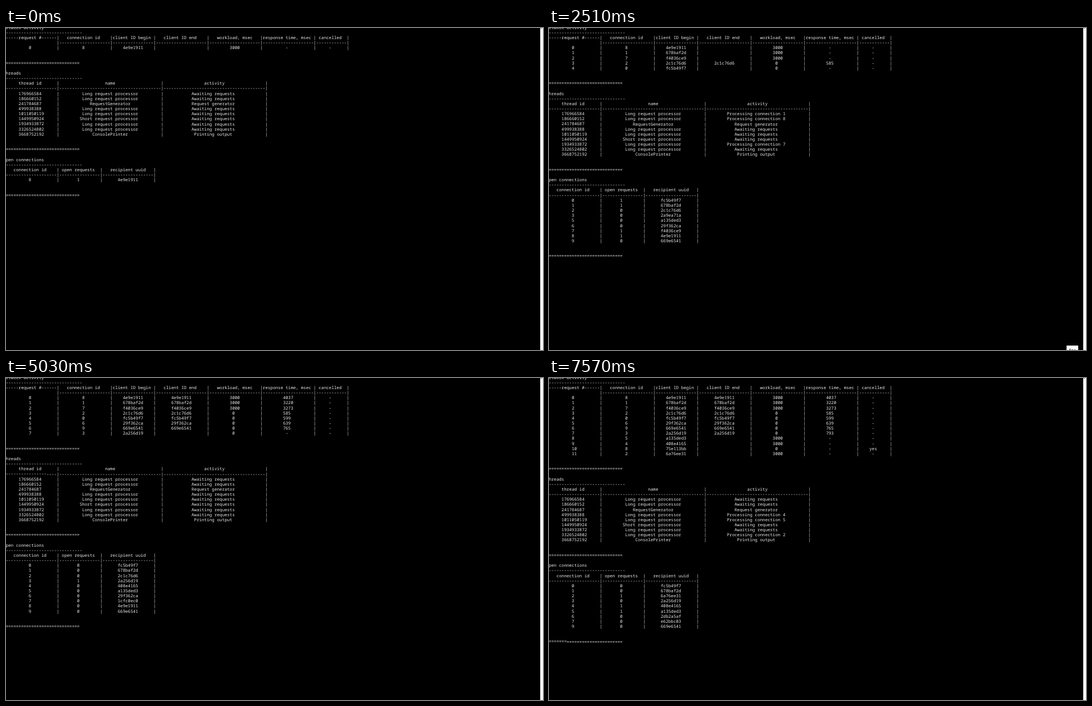
Recreate the animation shown at these times as an HTML page. Size 966 by 580 pixels, loop 8 s.

```html
<!DOCTYPE html>
<html lang="en">
<head>
<meta charset="utf-8">
<title>Request console</title>
<style>
  html, body { margin: 0; width: 100%; height: 100%; overflow: hidden; background: #000; }
  #stage { position: absolute; left: 0; top: 0; width: 966px; height: 580px; overflow: hidden; background: #000; }
  /* The tiny rotation keeps rows on fractional pixels instead of snapping them. */
  #console {
    position: absolute; left: 0; top: 0; margin: 0;
    color: #e8e8e8; font: 15px/18px "Noto Sans Mono", monospace;
    font-variant-ligatures: none; text-rendering: geometricPrecision;
    transform-origin: 0 0; transform: translate(-0.3px, -5.5px) rotate(0.002deg) scale(0.50842);
  }
  #bar { position: absolute; left: 961px; top: 0; width: 5px; height: 580px; background: #f8f8f8; }
  #bar::before { content: ""; position: absolute; left: 1px; top: 0; width: 2px; height: 1px; background: #777; }
  #tip {
    position: absolute; left: 931px; top: 572px; width: 21px; height: 16px; opacity: 0;
    background: #fff; color: #000; text-align: center;
    font: 7.5px/17px "DejaVu Sans Mono", monospace; text-rendering: geometricPrecision;
  }
</style>
</head>
<body>
<div id="stage">
  <pre id="console"></pre>
  <div id="bar"></div>
  <div id="tip">fps</div>
</div>
<script>
const LOOP = 8000, NEVER = 1e9;

// start, connection, client id, workload, end, response time
const requests = [
  [0, 8, "4e9e1911", 3000, 3370, 4037],
  [730, 1, "678baf2d", 3000, 3370, 3220],
  [1010, 7, "f4036ce9", 3000, 3960, 3273],
  [1620, 2, "2c1c76d6", 0, 2510, 585],
  [2510, 0, "fc5b49f7", 0, 3370, 599],
  [3370, 6, "29f362ca", 0, 3960, 639],
  [4230, 9, "669e6541", 0, 4770, 765],
  [5030, 3, "2a256d19", 0, 5580, 793],
  [5580, 5, "a135ded3", 3000, NEVER],
  [6370, 4, "408e4165", 3000, NEVER],
  [6980, 8, "75e113bb", 0, NEVER],
  [7570, 2, "6a76ee31", 3000, NEVER]
];
const cancel = { 10: 7570 };

// time: clients that join, as connection:uuid (an empty uuid closes it)
const joins = [
  [0, "8:4e9e1911"],
  [730, "1:678baf2d 2:2c1c76d6 6:29f362ca 7:f4036ce9 9:669e6541"],
  [1620, "3:2a9ea71a"],
  [2510, "0:fc5b49f7 5:a135ded3"],
  [4230, "3:2a256d19 4:408e4165 7:1cfc0ec0"],
  [6980, "2:6a76ee31 6:2db2a5af 7:e62bbc03 8:75e113bb"],
  [7570, "8:"]
];

const LONG = "Long request processor", IDLE = "Awaiting requests";
const threads = [
  [176966584, LONG, IDLE],
  [186660152, LONG, IDLE],
  [241784687, "RequestGenerator", "Request generator"],
  [499938388, LONG, IDLE],
  [1011050119, LONG, IDLE],
  [1449950924, "Short request processor", IDLE],
  [1934933872, LONG, IDLE],
  [3326524802, LONG, IDLE],
  [3668752192, "ConsolePrinter", "Printing output"]
];

// thread, connection, from, to
const jobs = [
  [0, 1, 730, 3370], [1, 8, 730, 3370], [6, 7, 1010, 3960],
  [4, 5, 5580, NEVER], [3, 4, 6780, NEVER], [7, 2, 7570, NEVER]
];

const tipSteps = [[0, 0], [1080, 0.33], [1150, 0.67], [1220, 1], [4295, 0.5], [4360, 0]];

function center(value, width) {
  const s = String(value);
  const left = Math.floor((width - s.length) / 2);
  return (" ".repeat(left) + s).padEnd(width);
}

const line = (cells, widths) => cells.map((c, i) => center(c, widths[i]) + "|").join("");

function table(title, widths, head, rows, rule) {
  return [
    title, "-".repeat(30),
    line(head, widths),
    rule || line(widths.map(w => "-".repeat(w)), widths),
    ...rows.map(r => line(r, widths)),
    "", "", "=".repeat(29), ""
  ];
}

function network(t) {
  const widths = [20, 20, 16, 20, 20, 20, 12];
  const head = ["-----request #------", "connection id", "client ID begin", "client ID end",
    "workload, msec", "response time, msec", "cancelled"];
  const rows = requests.filter(r => r[0] <= t).map(([, conn, id, work, end, ms], i) => {
    const done = end <= t;
    return [i, conn, id, done ? id : "", work, done ? ms : "-", cancel[i] <= t ? "yes" : "-"];
  });
  const rule = line(widths.map((w, i) => (i ? "-" : " ").repeat(w)), widths);
  return table("etwork activity", widths, head, rows, rule);
}

function threadList(t) {
  const rows = threads.map(([id, name, idle], i) => {
    const job = jobs.find(([n, , from, to]) => n === i && from <= t && t < to);
    return [id, name, job ? "Processing connection " + job[1] : idle];
  });
  return table("hreads", [20, 40, 40], ["thread id", "name", "activity"], rows);
}

function connections(t) {
  const uuid = [];
  for (const [from, list] of joins) {
    if (from > t) break;
    for (const item of list.split(" ")) {
      const [conn, id] = item.split(":");
      uuid[conn] = id;
    }
  }
  const rows = [];
  uuid.forEach((id, conn) => {
    const open = requests.filter(r => r[1] === conn && r[0] <= t && t < r[4]).length;
    if (id) rows.push([conn, open, id]);
  });
  return table("pen connections", [20, 16, 20], ["connection id", "open requests", "recipient uuid"], rows);
}

const out = document.getElementById("console");
const tip = document.getElementById("tip");
const start = performance.now();
let shown = "";

function draw() {
  const t = (performance.now() - start) % LOOP;
  const text = [...network(t), ...threadList(t), ...connections(t)].join("\n");
  if (text !== shown) out.textContent = shown = text;
  tip.style.opacity = tipSteps.filter(s => s[0] <= t).pop()[1];
  requestAnimationFrame(draw);
}
draw();
</script>
</body>
</html>
```
